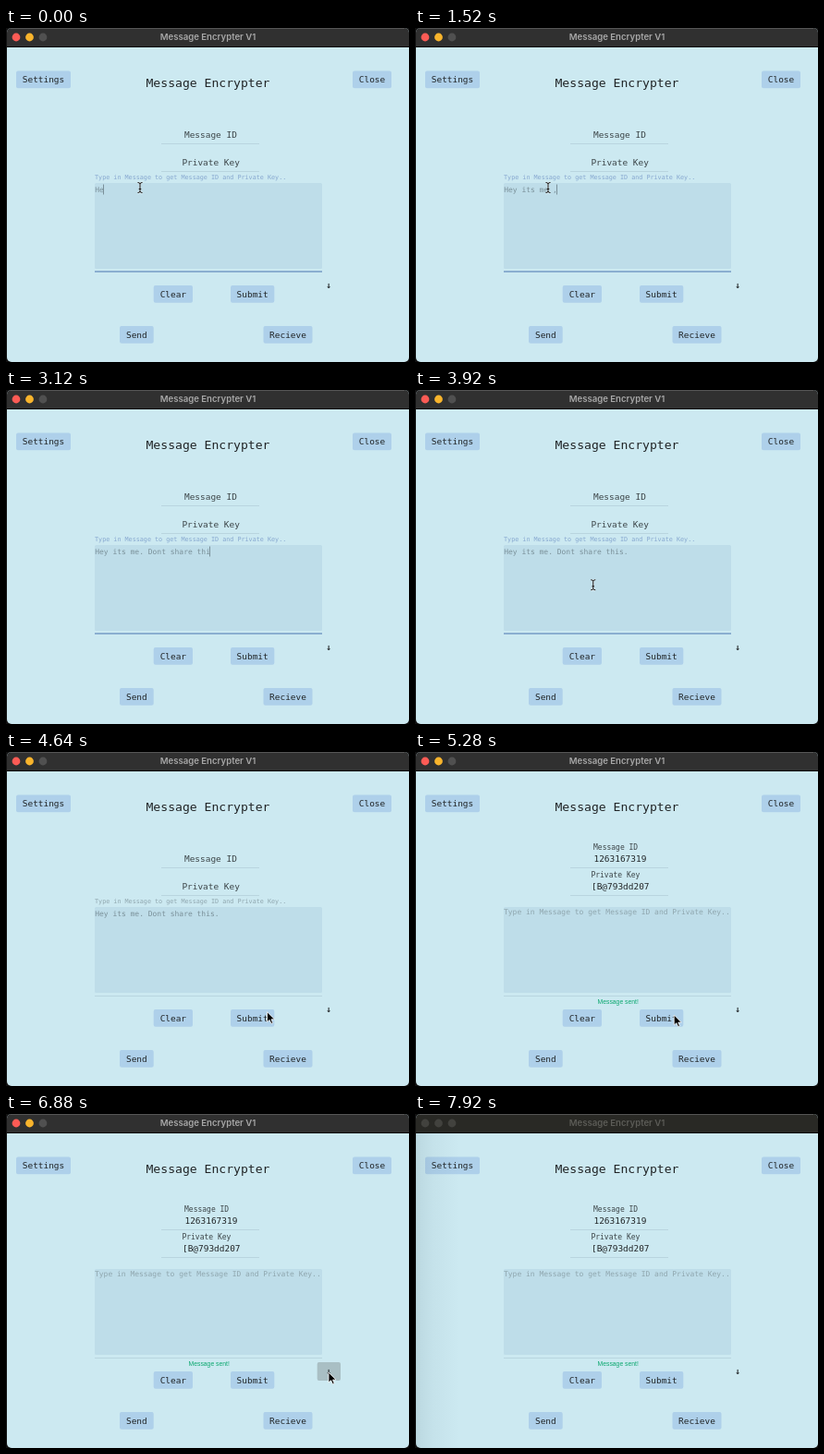
Animation of 436x362 px, one loop 8 s. Source, as an HTML page:

```html
<!DOCTYPE html>
<html lang="en">
<head>
<meta charset="utf-8">
<title>Message Encrypter V1</title>
<style>
html, body { margin: 0; width: 100%; height: 100%; overflow: hidden; background: #111; }
svg { display: block; width: 436px; height: 362px; }
text { font-family: "DejaVu Sans Mono", monospace; font-size: 9.45px; fill: #202426; white-space: pre; }
.mid { text-anchor: middle; }
.ui { font-family: Inter, "Liberation Sans", sans-serif; font-weight: 600; font-size: 9.6px; }
.note { font-family: "Liberation Sans", sans-serif; font-size: 6.8px; fill: #0ba86f; }
.line { stroke: #b9d5df; }
</style>
</head>
<body>
<svg viewBox="0 0 436 362">
  <defs>
    <linearGradient id="shade">
      <stop offset="0" stop-color="#1c3a44" stop-opacity=".1"/>
      <stop offset=".4" stop-color="#1c3a44" stop-opacity=".04"/>
      <stop offset="1" stop-color="#1c3a44" stop-opacity="0"/>
    </linearGradient>
    <clipPath id="frame"><rect x="1" width="435" height="362" rx="5"/></clipPath>
  </defs>
  <rect width="436" height="362" fill="#111"/>
  <g clip-path="url(#frame)">
    <rect width="436" height="362" fill="#cce9f1"/>
    <rect id="bar" width="436" height="20"/>
    <path d="M0 20.5H436" stroke="#0c0c0c"/>
    <path d="M5 .5H431" stroke="#686868" opacity=".7"/>
    <circle class="light" cx="11" cy="10" r="4.4"/>
    <circle class="light" cx="25.5" cy="10" r="4.4"/>
    <circle class="light" cx="40" cy="10" r="4.4"/>
    <text id="title" class="ui mid" x="218.5" y="13.4">Message Encrypter V1</text>

    <text class="mid" x="218.5" y="64" style="font-size:13.1px">Message Encrypter</text>
    <g id="buttons"></g>

    <path class="line" d="M168 125.5H274M168 155.5H274"/>
    <text id="idLabel">Message ID</text>
    <text id="keyLabel">Private Key</text>
    <g id="values">
      <text x="193.5" y="119.2">1263167319</text>
      <text x="191" y="149.1">[B@793dd207</text>
      <text class="note mid" x="219.7" y="273">Message sent!</text>
    </g>

    <rect x="96" y="168" width="246" height="93" rx="1.5" fill="#bedde9"/>
    <path class="line" d="M96 264.5H342"/>
    <path id="focus" d="M96 264H342" stroke="#8aaed0" stroke-width="2"/>
    <text id="prompt">Type in Message to get Message ID and Private Key..</text>
    <text id="msg" x="96.2" y="178" style="font-size:7.97px;fill:#7a9099"></text>
    <path id="caret" d="M.5 169.5V180.5" stroke="#7a9099"/>

    <rect id="hover" x="336.7" y="269" width="25.3" height="20" rx="2" fill="#a9bfc4"/>
    <text class="mid" x="349.3" y="282.3" font-weight="700">↓</text>
    <rect id="dim" y="21" width="48" height="341" fill="url(#shade)"/>
  </g>
  <g id="beam" fill="none">
    <path d="M-2.5 -5.5Q0 -5.5 0 -4Q0 -5.5 2.5 -5.5M0 -4V4M-2.5 5.5Q0 5.5 0 4Q0 5.5 2.5 5.5M-1.3 1.5H1.3" stroke="#fff" stroke-width="2.2" opacity=".55"/>
    <path d="M-2.5 -5.5Q0 -5.5 0 -4Q0 -5.5 2.5 -5.5M0 -4V4M-2.5 5.5Q0 5.5 0 4Q0 5.5 2.5 5.5M-1.3 1.5H1.3" stroke="#111"/>
  </g>
  <path id="arrow" d="M0 0V11L2.6 8.7L4.4 12.7L6.2 11.9L4.5 8.1H8Z" fill="#000" stroke="#fff" stroke-width=".8"/>
</svg>
<script>
const LOOP = 8000, TICK = 80, SENT = 5040, BLUR = 4560, INACTIVE = 7840;
const $ = id => document.getElementById(id);
const show = (id, on) => $(id).style.display = on ? "" : "none";
const mix = (a, b, k) => a + (b - a) * k;
const clamp = v => Math.max(0, Math.min(1, v));
const ease = k => k * k * (3 - 2 * k);

// label, x, y, width
const buttons = [
  ["Settings", 11, 46.5, 59], ["Close", 375, 46.5, 42],
  ["Clear", 159.7, 279, 42.3], ["Submit", 243, 279, 47.3],
  ["Send", 123, 323, 36.7], ["Recieve", 278.5, 323, 53]
];
$("buttons").innerHTML = buttons.map(([s, x, y, w]) =>
  `<rect x="${x}" y="${y}" width="${w}" height="18.7" rx="2" fill="#aed0ea"/>
   <text class="mid" x="${x + w / 2}" y="${y + 12.7}">${s}</text>`).join("");

// start time, full text, visible letters at start, ms per letter
const typing = [
  [0, "Hey its me ,", 2, 152],
  [1600, "Hey its me ", 11, 80],
  [1680, "Hey its me", 10, 80],
  [1920, "Hey its me. Dont share this.", 11, 80]
];

// time, x, y
const moves = [
  [0, 145, 173], [1360, 145, 173], [1440, 144, 173], [3600, 144, 173],
  [4400, 282.5, 281.7], [5120, 282.5, 281.7], [5840, 264.8, 308],
  [6160, 264.8, 308], [6720, 349, 280], [7760, 349, 280]
];

function pointer(t) {
  let i = moves.findIndex(m => m[0] > t);
  if (i < 0) i = moves.length - 1;
  const [t0, x0, y0] = moves[i - 1], [t1, x1, y1] = moves[i];
  const k = ease(clamp((t - t0) / (t1 - t0)));
  return [mix(x0, x1, k), mix(y0, y1, k)];
}

function message(t) {
  if (t >= SENT) return "";
  const [start, text, from, step] = typing.filter(p => p[0] <= t).pop();
  return text.slice(0, from + Math.floor((t - start) / step));
}

function place(id, x, y, size, fill) {
  const el = $(id);
  el.setAttribute("x", x);
  el.setAttribute("y", y);
  el.style.fontSize = size + "px";
  el.style.fill = fill;
}

function draw(t) {
  const focused = t < BLUR, inactive = t >= INACTIVE;
  const lift = ease(clamp((t - SENT + TICK) / 240));
  const size = mix(9.45, 8, lift);
  place("idLabel", 193, mix(119.2, 106, lift), size, "#3c4548");
  place("keyLabel", 190.4, mix(149.1, 135.8, lift), size, "#3c4548");
  place("prompt", 96, mix(164, 176.2, lift), mix(6.75, 7.97, lift), focused ? "#86a7cf" : "#8fa6ae");
  show("values", t >= SENT);
  show("focus", focused);

  const text = message(t);
  $("msg").textContent = text;
  $("caret").setAttribute("transform", `translate(${Math.round(95.6 + text.length * 4.8)} 0)`);
  show("caret", focused && (t < 3600 || t % 1000 < 500));

  const [x, y] = pointer(t);
  const inText = x > 96 && x < 342 && y > 168 && y < 261;
  const visible = (t < 1920 || t >= 3600) && t < 7760;
  show("beam", visible && inText);
  show("arrow", visible && !inText);
  for (const id of ["beam", "arrow"]) $(id).setAttribute("transform", `translate(${x} ${y})`);
  show("hover", visible && x > 336.7 && y > 269 && y < 289);

  $("bar").style.fill = inactive ? "#292925" : "#303030";
  $("title").style.fill = inactive ? "#5c5c57" : "#a8a8a8";
  const lights = inactive ? ["#42423e", "#42423e", "#42423e"] : ["#fc5b55", "#f8b42c", "#505050"];
  document.querySelectorAll(".light").forEach((c, i) => c.style.fill = lights[i]);
  $("dim").style.opacity = clamp((t - 7760) / 160);
}

let origin;
function frame(now) {
  origin ??= now;
  draw(Math.floor((now - origin) % LOOP / TICK) * TICK);
  requestAnimationFrame(frame);
}
draw(0);
requestAnimationFrame(frame);
</script>
</body>
</html>
```
